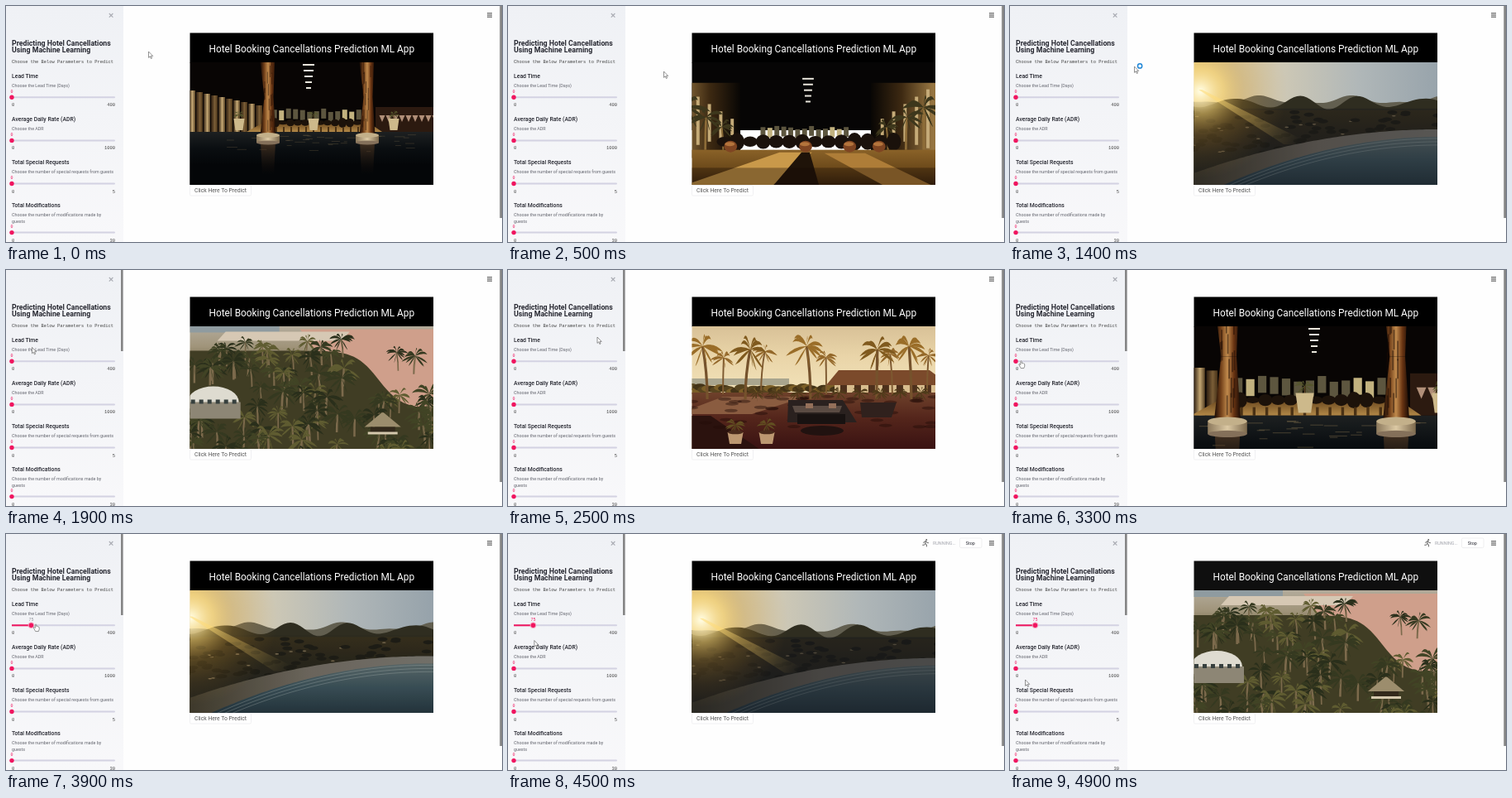
An HTML page with a canvas for the animation above (5000 ms loop, 600 by 285 pixels).

```html
<!DOCTYPE html>
<html lang="en">
<head>
<meta charset="utf-8">
<title>Booking app demo</title>
<style>
html, body { margin: 0; width: 100%; height: 100%; overflow: hidden; background: #fefefe; }
canvas, svg { position: absolute; left: 0; top: 0; width: 600px; height: 285px; }
text { font-family: Roboto, "Open Sans", sans-serif; }
.mono { font-family: "Liberation Mono", "Noto Sans Mono", monospace; }
</style>
</head>
<body>
<canvas id="film" width="600" height="285"></canvas>
<svg id="ui" viewBox="0 0 600 285">
  <defs>
    <linearGradient id="side" x2="0" y2="1">
      <stop stop-color="#eff1f5"/><stop offset="1" stop-color="#f8f8fa"/>
    </linearGradient>
  </defs>
  <rect width="142" height="285" fill="url(#side)"/>
  <rect x="597.3" width="2.7" height="256" fill="#858585"/>
  <rect id="bar" x="139" width="2.6" height="98" fill="#858585"/>
  <path d="M124.8 9l4.6 4.6m0-4.6l-4.6 4.6" stroke="#a9abb3" stroke-width="1.2"/>
  <path d="M582 8.8h6m-6 2.2h6m-6 2.2h6" stroke="#444"/>
  <rect x="222.5" y="216.5" width="74" height="12.5" rx="1.5" fill="#fff" stroke="#ececef" stroke-width=".8"/>
  <g id="labels"></g>
  <g id="sliders"></g>
  <g id="running">
    <circle cx="506.2" cy="7" r="1" fill="#666"/>
    <path d="M505.6 8.6l-1 3 1.7 1 .1 2.4M504.7 11.8l-1 1.4-2 .1M505.6 8.6l-2.2.7-.6 1.5M505.8 9l1.2 1.5 1.5.2"
      fill="none" stroke="#666" stroke-linecap="round"/>
    <rect x="546.5" y="5" width="26.5" height="11.6" rx="1.5" fill="#fff" stroke="#e8e8ea" stroke-width=".7"/>
  </g>
  <g id="cursor" fill="#fff" stroke="#666" stroke-width=".7">
    <path id="arrow" d="M0 0V7.4L1.7 5.8 2.9 8.5 4.1 8 2.9 5.4H5.2Z"/>
    <path id="hand" d="M-1.6 4.2L-3.1 1.3Q-3.3.2-2.2.6L-1.2 1.6V-2.6Q-.4-3.8.2-2.6V-.4Q1-1.2 1.6-.3 2.3-.7 2.8.2 3.6 0 3.7 1V3.2L2.8 5.6H-.8Z"/>
    <circle id="busy" cx="6.6" cy="-.6" r="2.6" stroke="#1f86d6" stroke-width="1.5"/>
  </g>
</svg>
<script>
const $ = id => document.getElementById(id);
const LOOP = 5000, STEP = 100;
const c = $('film').getContext('2d');
const mix = (a, b, p) => a + (b - a) * p;
const rnd = n => { const v = Math.sin(n * 12.9898) * 43758.5453; return v - Math.floor(v); };
const times = (n, fn) => { for (let i = 0; i < n; i++) fn(i); };

// ---------- interface ----------
function add(parent, tag, attrs, str) {
  const el = document.createElementNS('http://www.w3.org/2000/svg', tag);
  for (const k in attrs) el.setAttribute(k, attrs[k]);
  if (str) el.textContent = str;
  parent.append(el);
  return el;
}
const label = (x, y, size, str, more, parent = $('labels')) =>
  add(parent, 'text', { x, y, 'font-size': size, fill: '#262730', ...more }, str);

const mono = { class: 'mono', fill: '#444' };
const grey = '#62646d', pink = '#f0155f';
['Predicting Hotel Cancellations', 'Using Machine Learning'].forEach((s, i) =>
  label(7, 47.6 + 8.5 * i, 8.78, s, { 'font-weight': 700 }));
label(7, 69, 5.4, 'Choose the Below Parameters to Predict', mono);
label(228, 225.2, 6.8, 'Click Here To Predict', { fill: '#555' });
label(245.5, 56.2, 11.85, 'Hotel Booking Cancellations Prediction ML App', { fill: '#fff' });
label(514, 13.2, 5.4, 'RUNNING...', { fill: '#a3a5ad' }, $('running'));
label(553.8, 12.8, 5.4, 'Stop', {}, $('running'));

function slider([name, max, ...notes], i) {
  const top = 110.3 + 52.1 * i, y = top + 7 * (notes.length - 1), g = $('sliders');
  label(7, top - 23.3, 6.85, name, { 'font-weight': 500 });
  notes.forEach((s, n) => label(7, top - 12.7 + n * 8, 5.35, s, { fill: grey }));
  label(7, y + 11, 5.4, '0', mono);
  label(132, y + 11, 5.4, max, { ...mono, 'text-anchor': 'end' });
  add(g, 'rect', { x: 7, y: y - 1, width: 125, height: 2, rx: 1, fill: '#d3d2e2' });
  return {
    fill: add(g, 'rect', { x: 7, y: y - 1, width: 0, height: 2, fill: pink }),
    ring: add(g, 'circle', { cx: 7, cy: y, r: 3.7, fill: '#f6a3c0', opacity: 0 }),
    knob: add(g, 'circle', { cx: 7, cy: y, r: 2.7, fill: pink }),
    num: label(7, y - 5.4, 5, '0', { class: 'mono', fill: pink, 'text-anchor': 'middle' }, g)
  };
}
const [lead] = [
  ['Lead Time', '400', 'Choose the Lead Time (Days)'],
  ['Average Daily Rate (ADR)', '1000', 'Choose the ADR'],
  ['Total Special Requests', '5', 'Choose the number of special requests from guests'],
  ['Total Modifications', '30', 'Choose the number of modifications made by', 'guests']
].map(slider);

// ---------- drawing helpers ----------
const FAR = 400;
function fade(dx, dy, x, y, ...cols) {
  const g = c.createLinearGradient(x, y, x + dx, y + dy);
  cols.forEach((col, i) => g.addColorStop(i / (cols.length - 1), col));
  return g;
}
const down = (y, h, ...cols) => fade(0, h, 0, y, ...cols);
const across = (x, w, ...cols) => fade(w, 0, x, 0, ...cols);
function box(col, x, y, w, h) { c.fillStyle = col; c.fillRect(x, y, w, h); }
const band = (col, y) => box(col, -FAR, y, FAR * 4, FAR);
function oval(col, x, y, rx, ry) {
  c.fillStyle = col;
  c.beginPath();
  c.ellipse(x, y, rx, ry, 0, 0, 7);
  c.fill();
}
// Slanted trapezium: centre and width at the top, then at the bottom.
function trap(col, x, y, w, x2, y2, w2) {
  c.fillStyle = col;
  c.beginPath();
  [[x - w / 2, y], [x + w / 2, y], [x2 + w2 / 2, y2], [x2 - w2 / 2, y2]].forEach(q => c.lineTo(...q));
  c.fill();
}
// Fills everything under a curve.
function below(col, curve) {
  c.fillStyle = col;
  c.beginPath();
  for (let x = 180; x <= 560; x += 4) c.lineTo(x, curve(x));
  c.lineTo(560, 260);
  c.lineTo(180, 260);
  c.fill();
}
function palm(x, y, h, r, leaf, trunk, seed) {
  const tx = x + (rnd(seed) - .5) * h * .2, ty = y - h;
  c.strokeStyle = trunk;
  c.lineWidth = Math.max(1, r * .13);
  c.beginPath();
  c.moveTo(x, y);
  c.quadraticCurveTo(x, y - h / 2, tx, ty);
  c.stroke();
  c.fillStyle = leaf;
  times(13, i => {
    const a = i / 13 * 6.283 + rnd(seed + i), len = r * (.75 + .4 * rnd(seed + i * 3));
    const dx = Math.cos(a) * len, dy = Math.sin(a) * len * .7;
    const mx = tx + dx * .6, my = ty + dy - r * .15;
    c.beginPath();
    c.moveTo(tx, ty);
    c.quadraticCurveTo(mx, my - r * .1, tx + dx, ty + dy + r * .25);
    c.quadraticCurveTo(mx, my + r * .25, tx, ty);
    c.fill();
  });
}
function zoom(x, y, z) { c.translate(x, y); c.scale(z, z); }
function lamps(x, y) { times(5, i => box('#e9e6dc', x - 6 + i, y + i * 7, 14 - i * 2, 2)); }
function windows(n, y) {
  times(n, i => box(rnd(i) > .7 ? '#c2b27f' : '#5d563f', (i - n / 2) * 8.5, y + rnd(i + 5) * 5, 6, 12));
}

// ---------- film scenes, p runs 0 to 1 ----------
function lobby(p) {
  band('#080504', 0);
  lamps(mix(365, 368, p), 70);
  zoom(377 - 18 * p, 118, 1 + 1.05 * p);
  times(10, i => {
    const x = -156 + i * 9;
    box(across(x, 9, '#2c1d10', i % 2 ? '#7b5e37' : '#c3a672', '#38250f'), x, -16 + i * 2, 8, 50 - i * 2);
  });
  box('#2c1a10', 70, 4, 75, 30);
  times(9, i => trap('#b18f78', 78 + i * 8, 14, 7, 78 + i * 8, 22, 0));
  windows(13, 5);
  trap(down(23, 12, '#6a481f', '#b98e4b'), -2, 23, 128, -4, 34, 164);
  times(14, i => { oval('#1c120a', -60 + i * 9, 23, 5, 2 + rnd(i) * 4); box('#4a3114', -60 + i * 9, 28, 2, 6); });
  [-95, -5, 92].forEach(x => {
    palm(x, 20, 7, 7, '#55552c', '#5a4023', x);
    trap('#cdb98b', x, 18, 13, x, 32, 9);
  });
  band(down(34, 40, '#1d2021', '#0a0e11', '#040608'), 34);
  times(40, i => box('rgba(190,160,105,.25)', rnd(i) * 220 - 110, 37 + rnd(i + 50) * 22, 4 + 9 * rnd(i + 9), .7));
  [-60, 60].forEach(x => {
    trap(down(46, 40, 'rgba(120,80,45,.5)', 'rgba(40,25,15,0)'), x, 46, 18, x, 86, 14);
    const bark = across(x - 9, 18, '#1d0d05', '#73411a', '#c08a4c', '#6a3513', '#1d0d05');
    trap(bark, x - 1, -60, 19, x + 1, -8, 11);
    trap(bark, x + 1, -8, 11, x, 38, 19);
    times(16, i => box('rgba(25,10,4,.5)', x - 7 + rnd(i + x) * 13, -50 + rnd(i) * 70, 1, 14));
    box(across(x - 14, 28, '#8c795c', '#dcc9a4', '#7c694d'), x - 14, 38, 28, 9);
    oval('#c3b08a', x, 38, 14, 3);
    oval('#84705a', x, 47, 14, 2.4);
  });
}
function interior(p) {
  zoom(360, 150, .92 + .2 * p);
  band('#060505', -FAR);
  [-1, 1].forEach(s => {
    box(across(s * 155, -s * 75, '#957440', '#3d2912', '#080604'), s > 0 ? 80 : -170, -58, 90, 92);
    times(5, i => box('#c5ab78', s * (148 - i * 14), -50 + i * 9, 4, 72 - i * 13));
    times(3, i => palm(s * (145 - i * 22), 24, 52 - i * 12, 26 - i * 5, '#3d371c', '#8d6c38', i + 5));
  });
  windows(13, -6);
  times(14, i => oval('#1a110b', -100 + i * 16, 14, 9, 6 + rnd(i) * 5));
  lamps(2, -64);
  band(down(24, 50, '#8a6228', '#694719', '#2e1c0b'), 24);
  trap('#c9994a', -12, 27, 40, -120, 80, 130);
  trap('#1f1309', 0, 27, 10, -15, 80, 70);
  trap('#ae7d38', 48, 28, 50, 130, 70, 60);
  band('rgba(20,10,4,.35)', 46);
  [-92, 0, 54, 90].forEach(x => {
    oval('#7f4522', x, 20, 8, 7);
    oval('#b3743c', x - 1, 17, 6, 2.5);
  });
}
function aerial(p) {
  c.translate(14 * (p - .4), 3 * p);
  band(across(222, 295, '#dcc891', '#cfc9b5', '#b0b7b8', '#97a3ab'), 0);
  const hill = (y, h, x0, gap) => x => y - h * Math.cos((x - x0) * Math.PI / gap) ** 2 - 2 * Math.sin(x / 9);
  below('#625f50', hill(116, 8, 300, 110));
  below('#2f2d20', hill(121, 13, 345, 76));
  band(down(124, 50, '#37301d', '#2b271b', '#25241d'), 124);
  times(150, i => {
    const big = i % 6;
    oval(big ? '#1e1d15' : '#7d6e52', 190 + rnd(i) * 350, 125 + rnd(i + 300) * 55, big ? 6 : 2.4, big ? 2.4 : .8);
  });
  const shore = (y, k) => x => y + k * ((517 - x) / 295) ** 2;
  below(across(222, 295, '#3f3a2b', '#706a60', '#77756e'), shore(147, 52));
  below(down(155, 60, '#5d6c6d', '#3a5058', '#25363e'), shore(156, 74));
  c.strokeStyle = 'rgba(190,200,195,.3)';
  c.lineWidth = 1;
  times(3, i => {
    c.beginPath();
    for (let x = 222; x < 560; x += 8) c.lineTo(x, shore(158 + 4 * i, 76)(x));
    c.stroke();
  });
  band(`rgba(20,22,28,${.5 * p})`, 122);
  const glow = c.createRadialGradient(227, 101, 2, 227, 101, 105);
  ['rgba(255,250,220,1)', 'rgba(255,215,110,.55)', 'rgba(205,150,50,.25)', 'rgba(200,140,40,.1)', 'rgba(200,140,40,0)']
    .forEach((col, i) => glow.addColorStop(i / 4, col));
  band(glow, 0);
  trap(fade(115, 66, 227, 101, 'rgba(255,220,120,.6)', 'rgba(255,210,100,0)'), 227, 99, 4, 345, 165, 34);
}
function grove(p) {
  c.translate(-14 * (p - .45), 10 * (p - .45));
  band(down(68, 50, '#b3ab9b', '#a0947a', '#6f6545'), 0);
  box('#8f9ba0', 190, 60, 140, 16);
  trap('#cf9f8b', 470, 72, 230, 520, 180, 180);
  trap('#d6c8b4', 340, 75, 150, 330, 86, 150);
  below('#403d24', x => 98 + 70 / (1 + Math.exp((450 - x) / 14)));
  times(110, i => {
    const y = 84 + i * 1.35, x = 222 + rnd(i + 40) * 310;
    const onDome = x < 288 && y > 120 && y < 178, onSand = x > 420 && y < 150 && i % 3;
    if (onDome || onSand) return;
    const leaf = ['#2a2f1b', '#414425', '#5f5c31', '#353920'][i % 4];
    palm(x, y + 22, 22, 12 + 9 * rnd(i + 70), leaf, '#7c6a4c', i * 7);
  });
  oval('#dedbd0', 250, 160, 31, 19);
  box('#8d8675', 215, 160, 68, 20);
  times(6, i => box('#37403e', 223 + i * 10, 157, 5, 5));
  trap('#9c8d6d', 455, 173, 3, 455, 190, 44);
  box('#33291b', 440, 190, 30, 8);
  box('#d5c8ad', 437, 196, 36, 3);
}
function patio(p) {
  zoom(368, 140, 1 + .05 * (p - .4));
  c.translate(-368, -140);
  band(down(68, 70, '#d8c197', '#e9d4a8', '#f0dfb5'), 0);
  box('#a9a58e', 190, 131, 150, 8);
  times(60, i => oval(['#57441f', '#7b5e27', '#433317'][i % 3], 222 + i * 5, 141 + rnd(i) * 6, 8, 4));
  trap('#7b4a2b', 455, 121, 110, 460, 139, 150);
  box('#d8bd8e', 395, 139, 125, 10);
  times(7, i => box('#4d301c', 402 + i * 17, 139, 8, 10));
  band(down(146, 66, '#70432c', '#54251b', '#3c1413'), 148);
  trap('#8a5c40', 310, 153, 100, 250, 174, 90);
  trap('#2b120e', 215, 176, 60, 240, 217, 130);
  times(50, i => oval('rgba(35,12,8,.45)', 222 + rnd(i) * 295, 152 + rnd(i + 60) * 40, 8, 2));
  [241, 287, 366, 446, 488].forEach((x, i) => {
    palm(x + 19, 150, 44 + 8 * rnd(i), 15, '#94682a', '#7d5930', i + 40);
    palm(x, 156, 64 - 4 * (i % 2), 25, i % 2 ? '#805a1e' : '#9a6d28', '#75522c', i * 11 + 2);
  });
  times(9, i => palm(300 + i * 25, 155, 7, 11, '#4f3b1a', '#4f3b1a', i + 90));
  trap('#2a211f', 372, 157, 66, 380, 184, 84);
  trap('#5a4b43', 374, 164, 60, 374, 172, 54);
  box('#181211', 350, 174, 58, 12);
  [364, 392].forEach(x => box('#94705a', x - 4, 161, 9, 6));
  oval('#211210', 380, 194, 26, 6);
  trap('#30211d', 448, 160, 44, 446, 178, 36);
  [275, 313].forEach(x => {
    palm(x, 196, 9, 12, '#625022', '#4d3b1d', x);
    trap('#bd9871', x, 196, 19, x, 210, 14);
    oval('#4a2b1c', x, 196, 9, 2.4);
  });
}

// ---------- timeline ----------
// start, scene, progress at start and end
const scenes = [
  [0, lobby, 0, .6], [300, interior, 0, 1], [900, aerial, 0, 1], [1700, grove, 0, 1],
  [2200, patio, 0, .9], [2900, lobby, 0, 1], [3500, interior, .3, 1],
  [3800, aerial, 0, 1], [4600, grove, 0, .6], [LOOP]
];
// time, x, y where the pointer turns or rests
const stops = [
  [0, 172.5, 55], [500, 188.5, 79], [1000, 60, 92], [1400, 150.5, 73], [2000, 22, 95], [2500, 108, 81],
  [3100, 14, 113], [3600, 14, 113], [3900, 36.5, 112], [4300, 36.5, 112], [4900, 18.5, 176], [LOOP, 18.5, 176]
];
const ease = p => p * p * (3 - 2 * p);
const ramp = (t, from, to) => Math.min(1, Math.max(0, (t - from) / (to - from)));
const show = (id, on) => $(id).setAttribute('opacity', +on);

function span(rows, t) {
  const i = rows.findLastIndex(r => r[0] <= t), a = rows[i], b = rows[i + 1];
  return [a, b, ramp(t, a[0], b[0])];
}

function drawFilm(t) {
  const [shot, , k] = span(scenes, t);
  c.clearRect(0, 0, 600, 285);
  c.save();
  c.globalAlpha = t >= 4700 ? .94 : 1;
  box('#000', 222.5, 32.5, 294.5, 36);
  c.beginPath();
  c.rect(222.5, 68, 294.5, 148);
  c.clip();
  c.globalAlpha = 1;
  shot[1](mix(shot[2], shot[3], k));
  c.restore();
}

function drawPage(t) {
  const [a, b, k] = span(stops, t);
  const x = mix(a[1], b[1], ease(k)), y = mix(a[2], b[2], ease(k));
  $('cursor').setAttribute('transform', `translate(${x} ${y})`);
  const grab = t >= 3100 && t < 4300;
  show('arrow', !grab);
  show('hand', grab);
  show('busy', t >= 1300 && t < 1600);
  show('bar', x < 142);
  show('running', ramp(t, 4000, 4400));

  const val = Math.round(75 * ease(ramp(t, 3600, 3900))), pos = 7 + 125 * val / 400;
  lead.fill.setAttribute('width', pos - 7);
  [lead.knob, lead.ring].forEach(el => el.setAttribute('cx', pos));
  lead.ring.setAttribute('opacity', +(t >= 3600));
  lead.num.setAttribute('x', pos);
  lead.num.setAttribute('fill', t >= 3700 && t < 4100 ? '#8d8f98' : pink);
  lead.num.textContent = val;
}

let last = -1;
function tick() {
  const t = Math.floor(performance.now() % LOOP / STEP) * STEP;
  if (t !== last) {
    last = t;
    drawFilm(t);
    drawPage(t);
  }
  requestAnimationFrame(tick);
}
tick();
</script>
</body>
</html>
```
